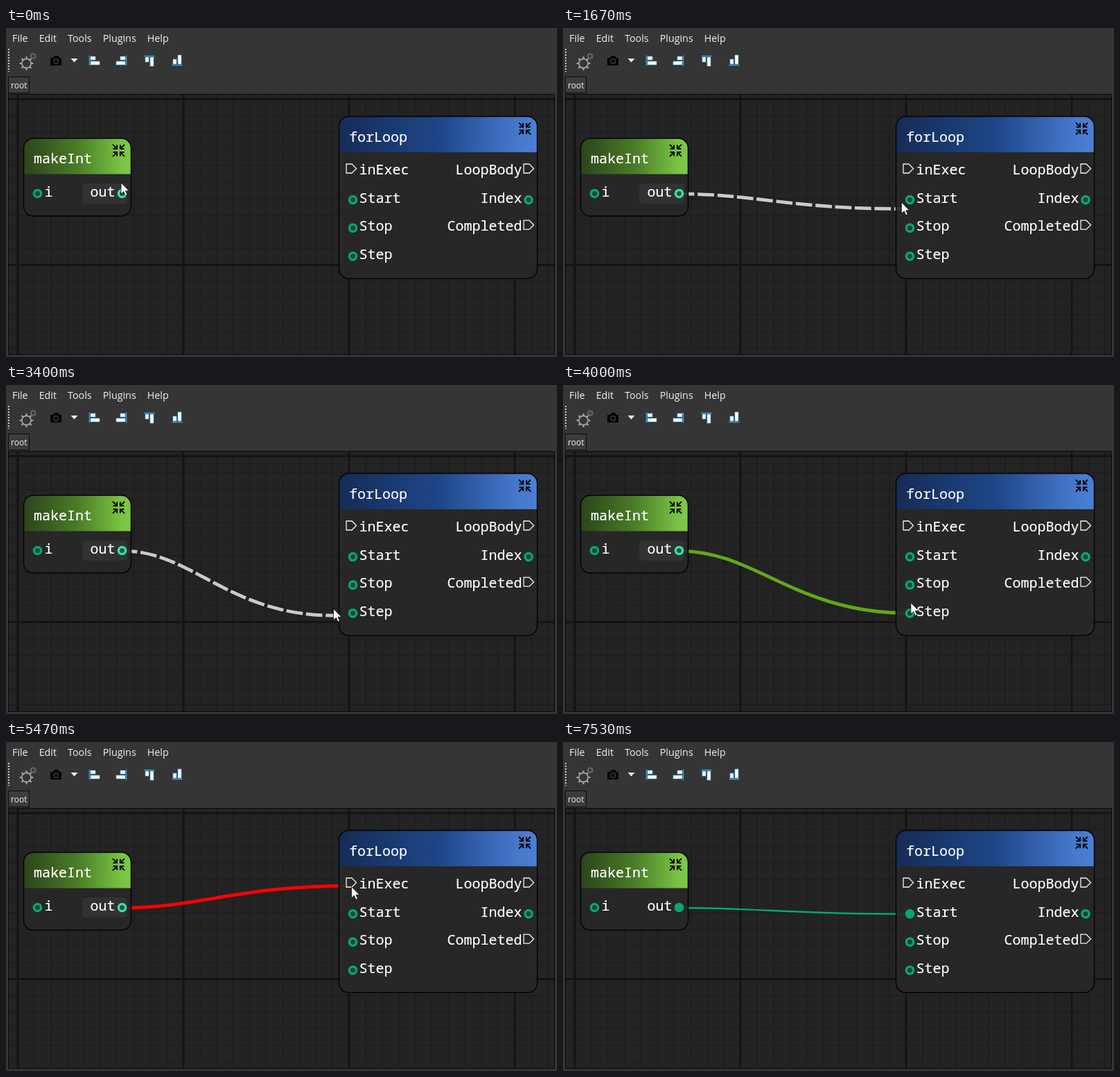
An HTML page for the animation above (8070 ms loop, 795x474 px).

```html
<!DOCTYPE html>
<html lang="en">
<head>
<meta charset="utf-8">
<title>Node graph</title>
<style>
html, body { margin: 0; width: 100%; height: 100%; overflow: hidden; background: #353535; }
svg { display: block; }
.ui { font: 14.3px "Open Sans", "Noto Sans", sans-serif; fill: #f2f2f2; }
.tab { font-size: 12px; }
.mono { font: 20px "Noto Sans Mono", "DejaVu Sans Mono", monospace; fill: #fff; stroke: #fff; stroke-width: .2; }
</style>
</head>
<body>
<svg id="stage" width="795" height="474" viewBox="0 0 795 474">
  <defs>
    <linearGradient id="green">
      <stop offset="0" stop-color="#2c441c"/><stop offset=".5" stop-color="#4a7c27"/>
      <stop offset=".9" stop-color="#78c244"/><stop offset="1" stop-color="#7dc84b"/>
    </linearGradient>
    <linearGradient id="blue">
      <stop offset="0" stop-color="#162c55"/><stop offset=".5" stop-color="#1d4688"/>
      <stop offset=".9" stop-color="#4678cb"/><stop offset="1" stop-color="#4a7fd5"/>
    </linearGradient>
    <clipPath id="view"><rect x="4" y="96" width="787" height="374"/></clipPath>
  </defs>
</svg>
<script>
const LOOP = 8070, STEP = 200 / 3;
const stage = document.getElementById('stage');

function add(tag, attrs, parent = stage) {
  const el = document.createElementNS('http://www.w3.org/2000/svg', tag);
  set(el, attrs);
  parent.appendChild(el);
  return el;
}
function set(el, attrs) {
  for (const name in attrs) el.setAttribute(name, attrs[name]);
}
function rect(x, y, width, height, fill, more, parent) {
  return add('rect', { x, y, width, height, fill, ...more }, parent);
}
function path(d, attrs, parent) {
  return add('path', { d, fill: 'none', ...attrs }, parent);
}
function label(text, x, y, cls, anchor = 'start') {
  add('text', { x, y, class: cls, 'text-anchor': anchor }).textContent = text;
}

function drawToolbar() {
  const menu = add('text', { x: 9, y: 20, class: 'ui' });
  ['File', 'Edit', 'Tools', 'Plugins', 'Help'].forEach((name, i) => {
    add('tspan', { dx: i ? 16 : 0 }, menu).textContent = name;
  });

  path('M4 30V63', { stroke: '#c8c8c8', 'stroke-width': 2, 'stroke-dasharray': '2 2' });
  drawGear(29.5, 51, 6.6, '#a8a8a8');
  drawGear(39.2, 40.5, 2.8, '#727272');

  path('M64 43h4l2-3h5l2 3h3v11h-16z', { fill: '#050505' });
  add('circle', { cx: 72.3, cy: 48, r: 3.3, fill: 'none', stroke: '#444', 'stroke-width': 1.2 });
  path('M93.5 44h10l-5 5.5z', { fill: '#f4f4f4' });

  // One align icon, turned to left, right, top and bottom
  ['1 0 0 1', '-1 0 0 1', '0 1 1 0', '0 -1 1 0'].forEach((turn, i) => {
    const icon = add('g', { transform: `matrix(${turn} ${127 + 40 * i} 47)` });
    path('M-6.5 -7.5V7.5', { stroke: '#3a9bd6', 'stroke-width': 1.6 }, icon);
    const edge = { stroke: '#59b4e4', 'stroke-width': .6 };
    rect(-5, -6, 7, 5, '#f4fbff', edge, icon);
    rect(-5, 1, 13, 5, '#f4fbff', edge, icon);
  });

  rect(3.5, 70.5, 30, 23, '#3c3c3c', { stroke: '#0c0c0c' });
  label('root', 7, 87, 'ui tab');
}

function drawGear(cx, cy, r, stroke) {
  const width = .7 + r / 7;
  add('circle', { cx, cy, r, fill: 'none', stroke, 'stroke-width': width });
  for (let a = 0; a < 360; a += 45)
    path(`M${r} 0H${r * 1.35 + 1}`,
      { stroke, 'stroke-width': width * 1.3, transform: `translate(${cx} ${cy}) rotate(${a})` });
}

function drawGrid() {
  rect(3.5, 95.5, 788, 375, '#232323', { stroke: '#0a0a0a' });
  const cell = 23.9;
  let fine = '', bold = '';
  for (let i = 0; i < 33; i++) {
    const line = `M${17 + i * cell} 96V470M4 ${102.5 + i * cell}H791`;
    if (i % 10) fine += line; else bold += line;
  }
  path(fine, { stroke: '#1c1c1c', 'stroke-width': 1.2, 'clip-path': 'url(#view)' });
  path(bold, { stroke: '#141414', 'stroke-width': 3, 'clip-path': 'url(#view)' });
}

function drawNode(title, x, y, w, h, fill) {
  rect(x, y, w, h, '#282828', { rx: 14, 'fill-opacity': .92 });
  path(`M${x} ${y + 51.5}V${y + 14}a14 14 0 0 1 14 -14H${x + w - 14}a14 14 0 0 1 14 14V${y + 51.5}z`,
    { fill: `url(#${fill})` });
  rect(x, y, w, h, 'none', { rx: 14, stroke: '#050505', 'stroke-width': 1.5 });
  label(title, x + 14.5, y + 36, 'mono');

  const icon = add('g', { transform: `translate(${x + w - 18} ${y + 17.5})` });
  for (let a = 0; a < 360; a += 90)
    path('M8.5 8.5L2.8 2.8M2.4 8V2.4H8',
      { stroke: '#000', 'stroke-width': 1.9, transform: `rotate(${a})` }, icon);
}

function drawPin(cx, cy) {
  const el = add('circle', { cx, cy, r: 5.1, 'stroke-width': 3.5 });
  paintPin(el, false, false);
  return el;
}
function paintPin(el, hot, full) {
  const color = hot ? '#35e2a4' : '#0aa572';
  set(el, { stroke: color, fill: full ? color : hot ? '#0d4a38' : '#083f2e' });
}
function drawExec(x, y) {
  path(`M${x} ${y - 6.5}h8l6.5 6.5l-6.5 6.5h-8z`, { stroke: '#f4f4f4', 'stroke-width': 1.3 });
}

const rowY = i => 207 + 40.6 * i;
const isExec = name => /inExec|LoopBody|Completed/.test(name);

// Draws a column of pins and returns them
function drawPins(names, pinX, execX, textX, anchor) {
  return names.map((name, i) => {
    label(name, textX, Math.round(rowY(i) + 4.2), 'mono', anchor);
    return isExec(name) ? drawExec(execX, rowY(i) - 4.5) : drawPin(pinX, rowY(i));
  });
}

drawToolbar();
drawGrid();
const wire = path('', { 'stroke-linecap': 'square' });

drawNode('makeInt', 25.5, 159, 155, 112, 'green');
const glow = rect(110, 224, 65, 29, '#323232', { rx: 5 });
drawPin(45.5, 238.5);
label('i', 55.5, 243, 'mono');
label('out', 121.5, 243, 'mono');
const outPin = drawPin(167.5, 238.5);

drawNode('forLoop', 480.5, 127.5, 286, 233.5, 'blue');
const startPin = drawPins(['inExec', 'Start', 'Stop', 'Step'], 500.5, 491, 509.5, 'start')[1];
drawPins(['LoopBody', 'Index', 'Completed'], 754, 747, 744.5, 'end');

const cursor = path('M0 0V16.2L3.8 12.7L6.3 18.6L8.9 17.5L6.4 11.7H11.5Z',
  { fill: '#fff', stroke: '#111', 'stroke-width': .8 });

// Pointer stops: time, x, y
const route = [
  [0, 166, 223], [200, 167, 227], [1000, 438, 243.5],   // leave the out pin
  [1930, 497, 255], [2330, 502, 270], [3000, 492, 312], // over Start and Stop
  [3400, 472.5, 322.5], [3700, 502, 333],               // aside, then Step
  [4600, 501, 237], [5200, 499, 195],                   // up to inExec
  [6000, 498, 247], [6270, 498, 247],                   // drop on Start
  [6730, 361, 358], [7000, 361, 358], [7530, 103, 476]  // leave the stage
];

function slope(i, axis) {
  if (i === 0 || i === route.length - 1) return 0;
  const rise = k => (route[k + 1][axis] - route[k][axis]) / (route[k + 1][0] - route[k][0]);
  const a = rise(i - 1), b = rise(i);
  return a * b > 0 ? 2 * a * b / (a + b) : 0;
}

// Monotone cubic through the stops
function pointer(t) {
  let i = 0;
  while (i < route.length - 2 && route[i + 1][0] <= t) i++;
  const start = route[i][0], span = route[i + 1][0] - start;
  const u = Math.min(1, (t - start) / span), v = 1 - u;
  return [1, 2].map(axis =>
    v * v * (1 + 2 * u) * route[i][axis] + u * u * (1 + 2 * v) * route[i + 1][axis] +
    span * u * v * (v * slope(i, axis) - u * slope(i + 1, axis)));
}

function drawWire(x, y, stroke, width, dashed) {
  const sx = 168, sy = 239, w = x - sx;
  set(wire, {
    d: `M${sx} ${sy}C${sx + w / 3} ${sy} ${x - w / 2} ${y} ${x} ${y}`,
    stroke, 'stroke-width': width,
    'stroke-dasharray': dashed ? `${4 * width} ${2 * width}` : 'none'
  });
}

const DRAG = 266, DROP = 6266, LEAVE = 6300;

function render(time) {
  const t = Math.floor((time % LOOP + 4) / STEP) * STEP;
  const [x, y] = pointer(t);
  set(cursor, { transform: `translate(${x.toFixed(1)} ${y.toFixed(1)})` });

  const linked = t >= DROP, hot = t < LEAVE;
  set(wire, { visibility: t < DRAG ? 'hidden' : 'visible' });
  set(glow, { visibility: hot ? 'visible' : 'hidden' });
  paintPin(outPin, hot, linked);
  paintPin(startPin, false, linked);

  // A loose wire hangs from the pointer; over a pin it snaps and shows if it fits
  const endY = y + 9.5;
  const row = Math.round((endY - rowY(0)) / 40.6);
  const over = x > 488 && Math.abs(endY - rowY(row)) < 12;
  if (linked) drawWire(500, 248, '#05a874', 2.4, false);
  else if (over) drawWire(500, rowY(row), row ? '#60a917' : '#ff0000', 4.75, false);
  else drawWire(x, endY, '#cbcbcb', 4.75, true);
}

const begin = performance.now();
function tick() {
  render(performance.now() - begin);
  requestAnimationFrame(tick);
}
tick();
</script>
</body>
</html>
```
